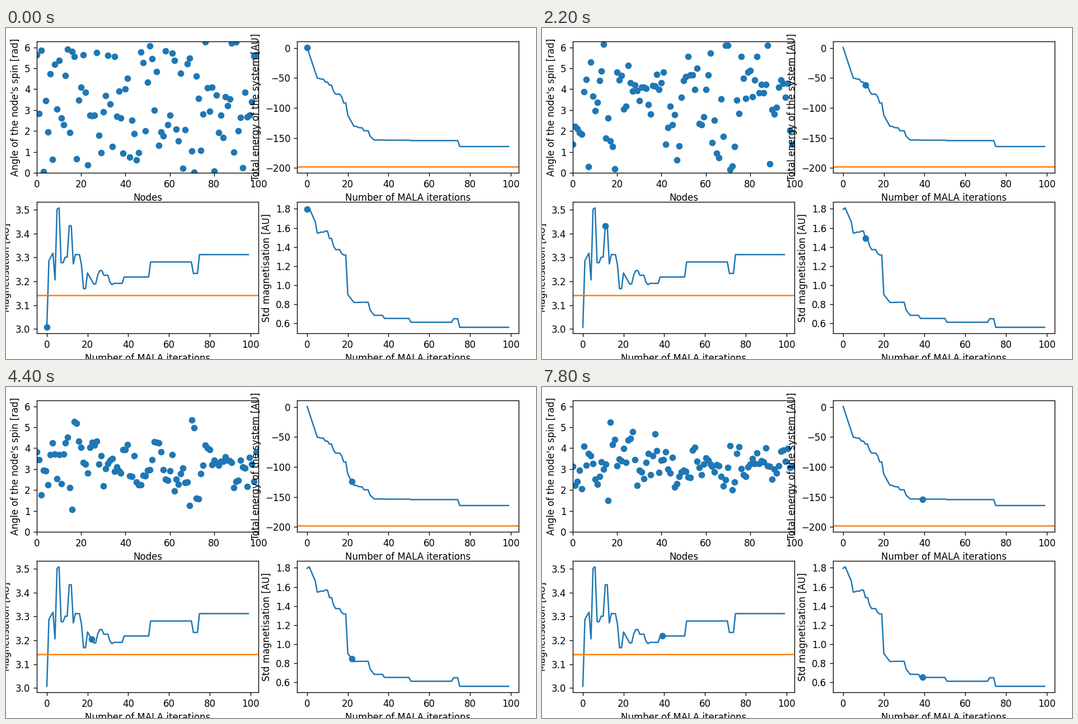
These frames come from a looping animation (947x592 px, 8 s). A matplotlib script:

```python
import numpy as np
import matplotlib.pyplot as plt
from matplotlib.animation import FuncAnimation

W, H, DPI = 947, 592, 120
BLUE, ORANGE = "#1f77b4", "#ff7f0e"
FRAMES, INTERVAL = 40, 200
ITERATIONS, NODES = 100, 100
TURN = 2 * np.pi

plt.rcParams.update({"font.family": "DejaVu Sans", "font.size": 10})

# Iterations with an accepted proposal; everything holds until the next one.
ACCEPTED = [*range(8), 9, 11, 13, 14, 17, 18, *range(20, 24), 25, 26, 28,
            31, 32, 33, 38, 51, 72, 75]
LAST = np.array([max(a for a in ACCEPTED if a <= k) for k in range(ITERATIONS)])


def stepped(keys):
    """Curve through {iteration: value}, constant between accepted proposals."""
    return np.interp(LAST, list(keys), list(keys.values()))


energy = stepped({0: 0.8, 5: -50.3, 7: -52, 11: -62, 14: -77, 17: -81.5,
                  20: -112, 23: -130.5, 26: -133, 28: -138, 33: -153.3,
                  51: -154.3, 72: -154.3, 75: -164.2})
mean = stepped({0: 3.007, 1: 3.287, 3: 3.318, 4: 3.206, 5: 3.502, 6: 3.508,
                7: 3.278, 9: 3.301, 11: 3.433, 13: 3.273, 14: 3.312,
                17: 3.269, 18: 3.169, 20: 3.235, 23: 3.189, 26: 3.245,
                32: 3.186, 38: 3.218, 51: 3.281, 72: 3.233, 75: 3.312})
std = stepped({0: 1.795, 1: 1.81, 4: 1.665, 5: 1.545, 9: 1.567, 14: 1.373,
               18: 1.317, 20: 0.903, 23: 0.82, 28: 0.822, 33: 0.685,
               38: 0.653, 51: 0.613, 72: 0.65, 75: 0.56})


def fit(spins, k):
    """Shift and scale the spins to the mean and spread of iteration k."""
    return (mean[k] + (spins - spins.mean()) * std[k] / spins.std()) % TURN


def simulate(dt=0.08, seed=4):
    """Langevin steps on a ring of spins that pull their neighbours along."""
    rng = np.random.default_rng(seed)
    spins = fit(rng.uniform(0, TURN, NODES - 1), 0)
    states = []
    for k in range(FRAMES):
        if k in ACCEPTED[1:]:
            pull = sum(np.sin(np.roll(spins, s) - spins) for s in (1, -1))
            noise = rng.normal(size=spins.size)
            spins = fit((spins + 2 * dt * pull + np.sqrt(2 * dt) * noise) % TURN, k)
        states.append(np.append(spins, spins[0]))
    return states


def panel(left, top, xlabel, ylabel, yticks):
    w, h = 396, 235
    ax = fig.add_axes([left / W, 1 - (top + h) / H, w / W, h / H])
    ax.set(xlabel=xlabel, ylabel=ylabel, yticks=yticks, xticks=range(0, 101, 20))
    return ax


def trace(ax, data, level=None):
    """Draw a curve, its optional reference level and the moving dot."""
    ax.plot(data, color=BLUE)
    low, high = data.min(), data.max()
    if level is not None:
        ax.axhline(level, color=ORANGE)
        low = min(low, level)
    pad = 0.05 * (high - low)
    ax.set(xlim=(-4.95, 103.95), ylim=(low - pad, high + pad))
    dot, = ax.plot([0], [data[0]], "o", color=BLUE)
    return dot, data


# The tiny surplus keeps the pixel size from rounding down.
fig = plt.figure(figsize=(W / DPI + 1e-9, H / DPI + 1e-9), dpi=DPI,
                 facecolor="white")
STEPS = "Number of MALA iterations"
LEFT, RIGHT, TOP, BOTTOM = 55, 520, 24, 311

spin_ax = panel(LEFT, TOP, "Nodes", "Angle of the node's spin [rad]", range(7))
spin_ax.set(xlim=(0, NODES), ylim=(0, TURN))
states = simulate()
cloud, = spin_ax.plot(np.arange(NODES), states[0], "o", color=BLUE)

energy_ax = panel(RIGHT, TOP, STEPS, "Total energy of the system [AU]",
                  range(-200, 1, 50))
mean_ax = panel(LEFT, BOTTOM, STEPS, "Magnetisation [AU]",
                np.arange(3.0, 3.55, 0.1))
std_ax = panel(RIGHT, BOTTOM, STEPS, "Std magnetisation [AU]",
               np.arange(0.6, 1.85, 0.2))

dots = [trace(energy_ax, energy, -2 * (NODES - 1)),
        trace(mean_ax, mean, np.pi),
        trace(std_ax, std)]


def update(k):
    cloud.set_ydata(states[k])
    for dot, data in dots:
        dot.set_data([k], [data[k]])
    return [cloud] + [dot for dot, _ in dots]


def init():
    return update(0)


anim = FuncAnimation(fig, update, frames=FRAMES, init_func=init,
                     interval=INTERVAL, repeat=True, repeat_delay=0, blit=False)
plt.show()
```
